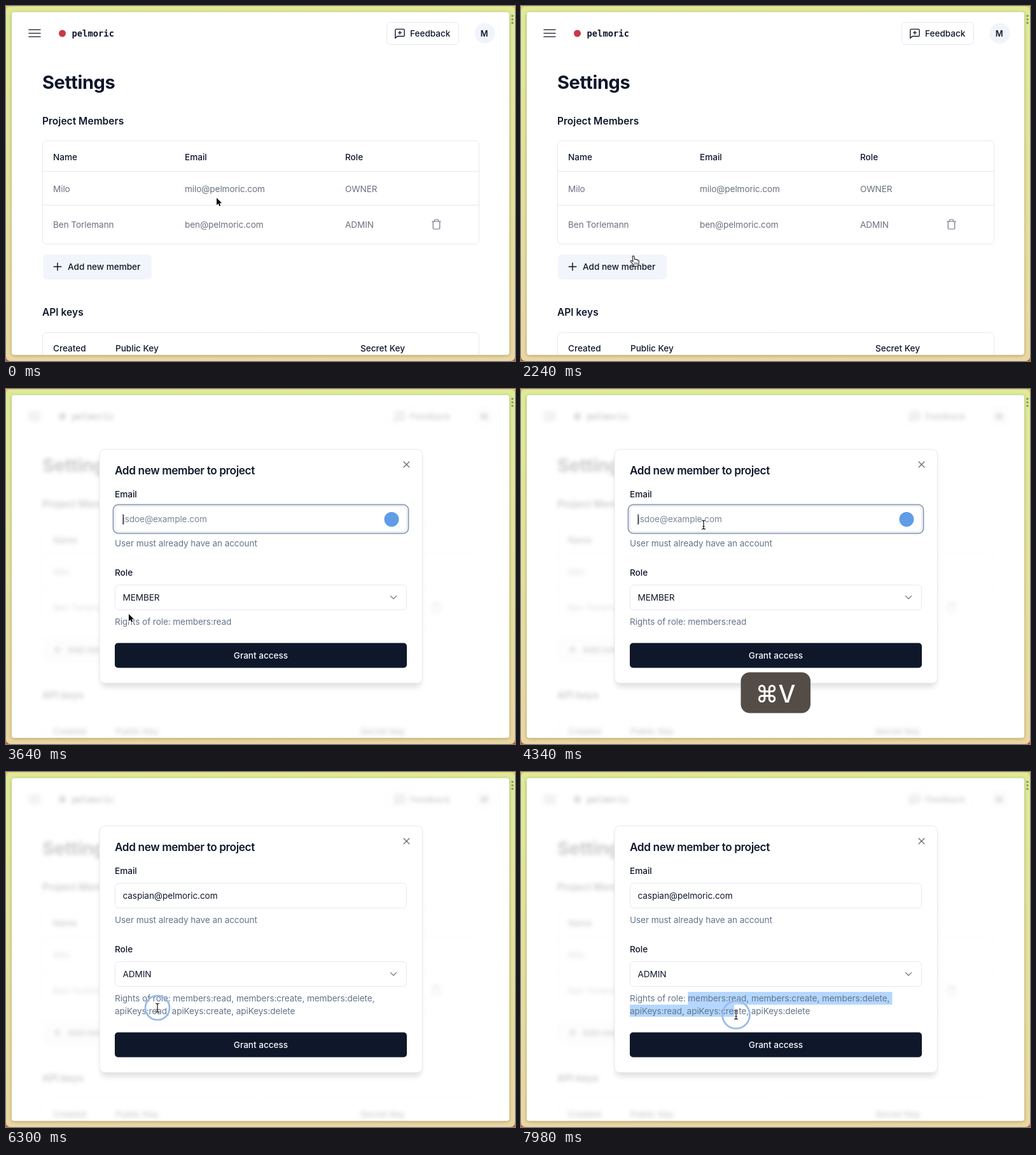
Write an HTML page with a canvas that moves like this. It is 800 by 557 pixels and loops after 8000 ms.

```html
<!DOCTYPE html>
<html lang="en">
<head>
<meta charset="utf-8">
<title>Add a project member</title>
<style>
html, body { margin: 0; width: 100%; height: 100%; overflow: hidden; background: #fff; }
canvas { display: block; width: 800px; height: 557px; }
</style>
</head>
<body>
<canvas id="stage" width="800" height="557"></canvas>
<script>
const W = 800, H = 557, LOOP = 8000, STEP = 70;
const SANS = 'Inter, "Liberation Sans", sans-serif';
const MONO = '"DejaVu Sans Mono", "Liberation Mono", monospace';
const INK = '#0f172a', GRAY = '#6b7080', SLATE = '#64748b', LINE = '#e5e8ee';

const OPEN = 3275, PASTE = 4400, KEYS = 4300, SELECT = 5320, PICK = 6300, DRAG = 7140;

const ICON = {
  menu: 'M3 6.5h18M3 12h18M3 17.5h18',
  note: 'M21 15a2 2 0 0 1-2 2H7l-4 4V5a2 2 0 0 1 2-2h14a2 2 0 0 1 2 2zM9 10h6M12 7v6',
  trash: 'M3 6h18M19 6v14a2 2 0 0 1-2 2H7a2 2 0 0 1-2-2V6M8 6V4a2 2 0 0 1 2-2h4a2 2 0 0 1 2 2v2',
  plus: 'M5 12h14M12 5v14',
  close: 'M18 6 6 18M6 6l12 12',
  down: 'm6 9 6 6 6-6',
  check: 'M20 6 9 17l-5-5'
};
const ARROW = new Path2D('M0 0V11.4L2.6 9 4.4 13 6.3 12.2 4.6 8.3H8.2Z');
const HAND = new Path2D('M-1.4 1.2C-1.4-.6 1.2-.6 1.4 1.2L2 5.6C2.6 4.6 4.2 4.8 4.4 6 5 5.2 6.6 5.6 6.7 6.8 ' +
  '7.4 6.2 8.8 6.8 8.8 8.2 9 11 8.4 12.4 7.6 13.8V16H.8V14.4C-.8 12.6-2.4 10.6-4 8.8-4.8 7.6-3.2 6.6-2 7.6L-.4 9Z');
const BEAM = new Path2D('M-3-7Q0-7 0-5Q0-7 3-7M0-5V5M-3 7Q0 7 0 5Q0 7 3 7M-1.5 2.5H1.5');

const clamp = v => Math.max(0, Math.min(1, v));
const smooth = p => p * p * (3 - 2 * p);
const lerp = (a, b, p) => a + (b - a) * p;

let ctx;

function setFont(size, weight, spacing, family = SANS) {
  ctx.font = `${weight} ${size}px ${family}`;
  ctx.letterSpacing = spacing + 'px';
}

// y is the middle of the capital letters
function text(str, x, y, o = {}) {
  const { size = 13.6, weight = 400, color = INK, spacing = -0.09, align = 'left', family } = o;
  setFont(size, weight, spacing, family);
  ctx.textAlign = align;
  ctx.fillStyle = color;
  ctx.fillText(str, x, y + size * 0.364);
}

function box(x, y, w, h, r, fill, stroke, lw = 1) {
  ctx.beginPath();
  ctx.roundRect(x, y, w, h, r);
  if (fill) { ctx.fillStyle = fill; ctx.fill(); }
  if (stroke) { ctx.strokeStyle = stroke; ctx.lineWidth = lw; ctx.stroke(); }
}

function dot(x, y, r, color) {
  ctx.beginPath();
  ctx.arc(x, y, r, 0, 7);
  ctx.fillStyle = color;
  ctx.fill();
}

function rule(x1, x2, y) {
  ctx.fillStyle = LINE;
  ctx.fillRect(x1, y, x2 - x1, 1);
}

function outline(path, color, width) {
  ctx.strokeStyle = color;
  ctx.lineWidth = width;
  ctx.stroke(path);
}

function icon(name, cx, cy, size, color, lw) {
  ctx.save();
  ctx.translate(cx - size / 2, cy - size / 2);
  ctx.scale(size / 24, size / 24);
  ctx.lineCap = ctx.lineJoin = 'round';
  outline(new Path2D(ICON[name]), color, lw * 24 / size);
  ctx.restore();
}

function withShadow(blur, y, color, draw) {
  ctx.save();
  ctx.shadowBlur = blur;
  ctx.shadowOffsetY = y;
  ctx.shadowColor = color;
  draw();
  ctx.restore();
}

function sheet() {
  const c = document.createElement('canvas');
  c.width = W;
  c.height = H;
  return c;
}

// Paints on another canvas, then returns to the current one
function paint(canvas, draw) {
  const last = ctx;
  ctx = canvas.getContext('2d');
  ctx.clearRect(0, 0, W, H);
  draw();
  ctx = last;
  return canvas;
}

function gradient(top, bottom) {
  const g = ctx.createLinearGradient(0, 0, 0, H);
  g.addColorStop(0, top);
  g.addColorStop(1, bottom);
  return g;
}

function drawFrame() {
  ctx.fillStyle = gradient('#f6c766', '#cb5a2c');
  ctx.fillRect(0, 0, W, H);
  box(0, 1, W, H - 1, 7, gradient('#deeb98', '#ead6a2'));
  withShadow(5, 1, 'rgba(90,90,20,.45)', () => box(9, 9.5, 782, 538, 4, '#fff'));
  for (const y of [15.5, 21, 26.5]) dot(796, y, 1.8, '#8d9662');
}

function drawPage() {
  ctx.beginPath();
  ctx.roundRect(9, 9.5, 782, 538, 4);
  ctx.clip();
  const medium = { weight: 500, spacing: -0.02 }, gray = { color: GRAY };
  const heading = { size: 15.5, weight: 600, spacing: 0.03 };

  icon('menu', 45, 42.7, 24, '#363b48', 1.5);
  dot(88.5, 43, 5.5, '#c8384a');
  text('pelmoric', 103.5, 42.8, { size: 13.8, weight: 700, family: MONO, spacing: 0 });
  box(598.5, 25.5, 113, 35, 6, '#fff', LINE);
  icon('note', 619, 43.5, 19, INK, 1.4);
  text('Feedback', 635, 43.5, medium);
  dot(752.5, 43, 16, '#f1f4fb');
  text('M', 751.5, 43.5, { size: 12.8, weight: 600, align: 'center' });

  text('Settings', 57, 119, { size: 29, weight: 700, spacing: -0.42 });
  text('Project Members', 57, 180, heading);
  box(57.5, 211.5, 686, 162, 6, null, LINE);
  rule(58, 743, 259);
  rule(58, 743, 312);
  const rows = [
    [237, medium, 'Name', 'Email', 'Role'],
    [287, gray, 'Milo', 'milo@pelmoric.com', 'OWNER'],
    [343, gray, 'Ben Torlemann', 'ben@pelmoric.com', 'ADMIN']
  ];
  for (const [y, style, ...cells] of rows)
    cells.forEach((cell, i) => text(cell, [74, 281, 533][i], y, style));
  icon('trash', 676.5, 342.5, 18, GRAY, 1.2);

  box(58, 390, 171, 39, 6, '#f2f5fc');
  icon('plus', 81, 409, 20, INK, 1.5);
  text('Add new member', 97, 409.5, medium);

  text('API keys', 57, 480.5, heading);
  box(57.5, 512.5, 686, 80, 6, null, LINE);
  text('Created', 74, 537, medium);
  text('Public Key', 172, 537, medium);
  text('Secret Key', 557, 537, medium);
}

const frame = paint(sheet(), drawFrame);
const page = paint(sheet(), drawPage);
const haze = paint(sheet(), () => {
  ctx.beginPath();
  ctx.rect(9, 9.5, 782, 538);
  ctx.clip();
  ctx.globalAlpha = 0.22;
  ctx.filter = 'blur(3px) grayscale(1)';
  ctx.drawImage(page, 0, 0);
});
const menuSheet = sheet();

// start, end, x, y
const MOVES = [
  [0, 0, 331, 301],
  [1820, 2340, 160, 402],
  [3360, 4200, 287, 213],
  [4620, 5250, 250, 328],
  [5530, 6090, 238, 370],
  [6440, 7000, 264, 356],
  [7210, 7980, 338, 381]
];
const CLICKS = [[2970, 3110], [SELECT, 5440], [6230, PICK], [DRAG, 9000]];

function pointer(t) {
  let [, , x, y] = MOVES[0];
  for (const [from, to, nx, ny] of MOVES.slice(1)) {
    const p = smooth(clamp((t - from) / (to - from)));
    x = lerp(x, nx, p);
    y = lerp(y, ny, p);
  }
  return { x, y };
}

function drawRing(t, { x, y }) {
  for (const [press, release] of CLICKS) {
    const fade = (t - release) / 200;
    if (t < press || fade >= 1) continue;
    const r = 18 + 5 * clamp((Math.min(t, release) - press) / 140) + 11 * clamp(fade);
    ctx.globalAlpha = 1 - clamp(fade);
    ctx.beginPath();
    ctx.arc(x, y, r - 1.5, 0, 7);
    ctx.strokeStyle = '#98bbea';
    ctx.lineWidth = 2.7;
    ctx.stroke();
    ctx.globalAlpha = 1;
  }
}

function drawPointer(t, { x, y }) {
  const onButton = t < OPEN && x > 58 && x < 229 && y > 388 && y < 429;
  const onText = t >= PICK || (t > OPEN && y < 224);
  ctx.save();
  ctx.translate(x, y);
  ctx.lineJoin = 'round';
  if (onText) {
    outline(BEAM, 'rgba(255,255,255,.8)', 2.6);
    outline(BEAM, '#111', 1.2);
  } else if (onButton) {
    ctx.fillStyle = '#fff';
    ctx.fill(HAND);
    outline(HAND, '#222', 1.1);
    ctx.beginPath();
    for (const fx of [2, 4, 6]) { ctx.moveTo(fx, 10); ctx.lineTo(fx, 13.5); }
    ctx.lineWidth = 0.8;
    ctx.stroke();
  } else {
    outline(ARROW, '#fff', 2);
    ctx.fillStyle = '#0a0a0a';
    ctx.fill(ARROW);
  }
  ctx.restore();
}

function drawEmail(t, top) {
  const y = top + 109.5, focus = t < SELECT, value = t >= PASTE ? 'caspian@pelmoric.com' : '';
  box(171.5, top + 89.5, 458, 39, 6, '#fff', LINE);
  text(value || 'jsdoe@example.com', 183.5, y, { color: value ? INK : '#7d8594' });
  if (!focus) return;
  box(168.5, top + 86.5, 464, 45, 8, null, '#95a1b8', 2);
  if ((t - OPEN) % 1000 < 500) {
    ctx.fillStyle = INK;
    ctx.fillRect(183.5 + (value ? ctx.measureText(value).width : 0), y - 8, 1.2, 16);
  }
  if (t > 3600) dot(606, y, 11.5, '#5f9de6');
}

function drawSelection(mouse, y, intro, first) {
  setFont(13.6, 400, -0.09);
  const from = 171 + ctx.measureText(intro).width;
  const end = 175 + ctx.measureText(first).width;
  const below = mouse.y > y + 10;
  ctx.fillStyle = '#b3d7ff';
  ctx.fillRect(from, y - 10, Math.max(0, (below ? end : mouse.x) - from), 20);
  if (below) ctx.fillRect(171, y + 10, mouse.x - 3 - 171, 19);
}

function drawMenu(t, top, mouse) {
  const p = clamp((t - SELECT - 60) / 150);
  const y = top + 252 + 4 * smooth(p);
  const active = t > 5530 && mouse.y < y + 37 && mouse.y > y + 5 ? 0 : 1;
  paint(menuSheet, () => {
    withShadow(5, 2, 'rgba(0,0,0,.1)', () => box(171.5, y + 0.5, 459, 71.5, 5, '#fff', LINE));
    box(176, y + 5 + active * 32, 450, 32, 3, '#f1f5f9');
    text('ADMIN', 208, y + 21);
    text('MEMBER', 208, y + 52.5);
    icon('check', 190, y + 52.5, 16, INK, 1.4);
  });
  ctx.save();
  ctx.globalAlpha = lerp(0.7, 1, p);
  ctx.drawImage(menuSheet, 0, 0);
  ctx.restore();
}

function drawDialog(t, mouse) {
  const p = clamp((t - OPEN) / 200), eased = smooth(p);
  const admin = t >= PICK, extra = admin ? 20 : 0;
  const top = 95 - extra / 2, height = 367 + extra;
  const label = { weight: 500, spacing: -0.02 }, hint = { color: SLATE };

  ctx.save();
  ctx.globalAlpha = lerp(0.9, 1, eased);
  const scale = lerp(0.904, 1, eased);
  ctx.translate(400.5, 278.5);
  ctx.scale(scale, scale);
  ctx.translate(-400.5, -278.5);

  withShadow(8, 6, 'rgba(0,0,0,.12)', () => box(149, top, 503.5, height, 8, '#fff'));
  box(147, top - 0.5, 507.5, height, 8, '#fff', LINE);
  text('Add new member to project', 171, top + 33, { size: 17.2, weight: 600, spacing: -0.38 });
  icon('close', 629.5, top + 23.5, 17.5, '#4b5260', 1.2);

  text('Email', 171, top + 70.5, label);
  drawEmail(t, top);
  text('User must already have an account', 171, top + 147.5, hint);

  text('Role', 171, top + 193, label);
  box(171.5, top + 212.5, 458, 39, 6, '#fff', LINE);
  text(admin ? 'ADMIN' : 'MEMBER', 183.5, top + 232.5);
  icon('down', 609, top + 232, 18, '#7b8290', 1.3);

  const intro = 'Rights of role: ';
  const first = intro + 'members:read' + (admin ? ', members:create, members:delete,' : '');
  if (t >= DRAG) drawSelection(mouse, top + 270, intro, first);
  text(first, 171, top + 270, hint);
  if (admin) text('apiKeys:read, apiKeys:create, apiKeys:delete', 171, top + 290, hint);

  box(171, top + 303.5 + extra, 459, 39, 5, INK);
  text('Grant access', 400.5, top + 323.5 + extra, { ...label, color: '#f8fafc', align: 'center' });
  if (t > SELECT && !admin) drawMenu(t, top, mouse);
  ctx.restore();
}

function drawKeys(t) {
  const alpha = 1 - clamp((t - 5250) / 700);
  if (t < KEYS || !alpha) return;
  ctx.save();
  ctx.globalAlpha = alpha;
  box(345.5, 444.5, 109.5, 64, 14, '#544c46');
  const white = { size: 38, weight: 500, color: '#fff', align: 'center', spacing: 0 };
  text('⌘', 386.5, 478, { ...white, size: 36, family: 'Inter, "DejaVu Sans", sans-serif' });
  text('V', 418, 478, white);
  ctx.restore();
}

const stage = document.getElementById('stage').getContext('2d');

function render() {
  const t = Math.floor(performance.now() % LOOP / STEP) * STEP;
  const mouse = pointer(t);
  ctx = stage;
  ctx.drawImage(frame, 0, 0);
  if (t < OPEN) {
    ctx.drawImage(page, 0, 0);
  } else {
    ctx.drawImage(haze, 0, 0);
    drawDialog(t, mouse);
    drawKeys(t);
  }
  drawRing(t, mouse);
  drawPointer(t, mouse);
  requestAnimationFrame(render);
}
render();
</script>
</body>
</html>
```
